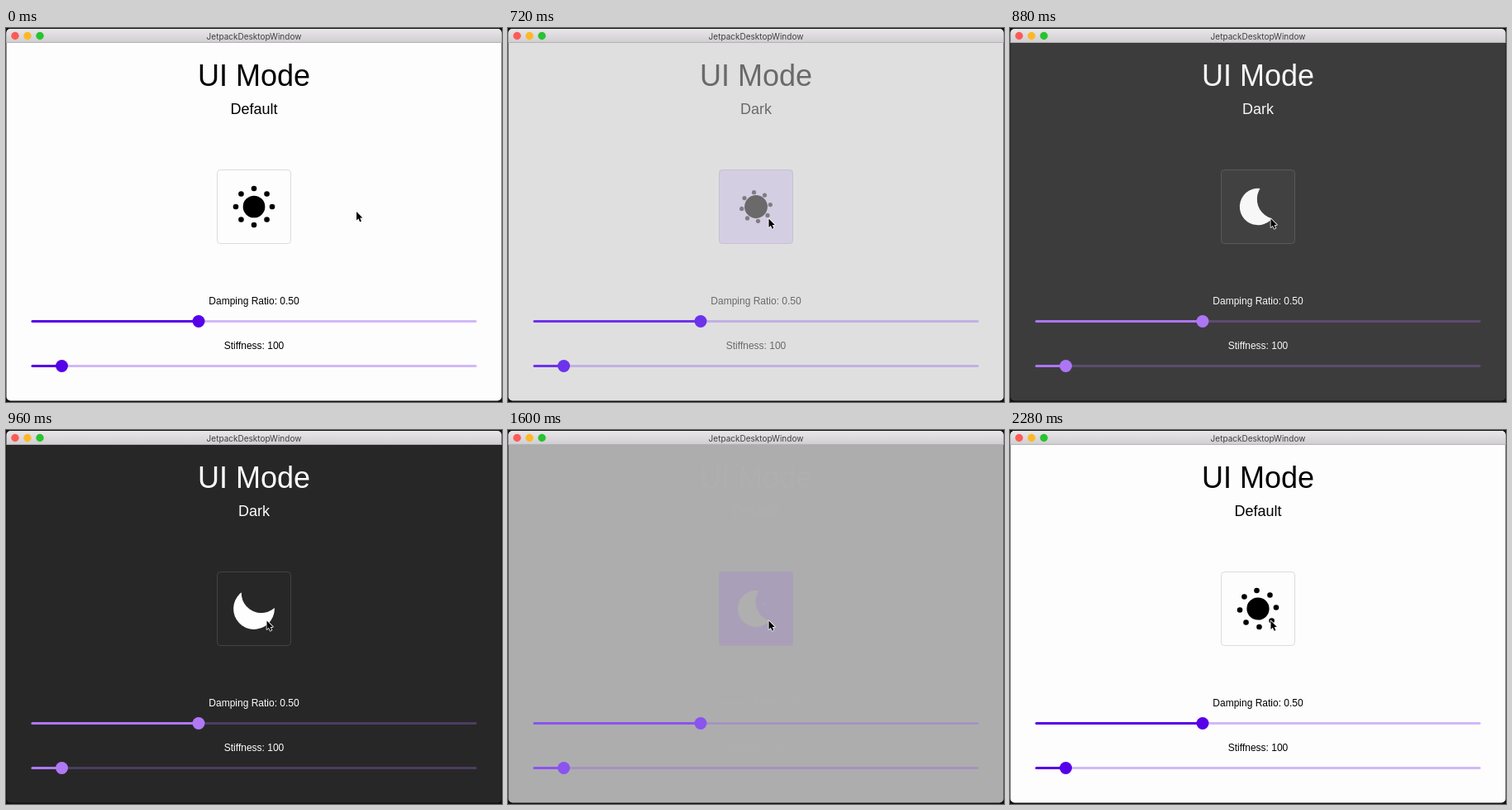
An HTML page with a canvas for the animation above (2.32 s loop, 600 by 452 pixels).

```html
<!DOCTYPE html>
<html lang="en">
<head>
<meta charset="utf-8">
<title>UI Mode</title>
<style>
html, body { margin: 0; width: 100%; height: 100%; overflow: hidden; background: #000; }
canvas { display: block; }
</style>
</head>
<body>
<canvas id="stage" width="600" height="452"></canvas>
<script>
const ctx = document.getElementById('stage').getContext('2d');
const LOOP = 2320, STEP = 40;
const TO_DARK = 685, TO_LIGHT = 1531;
const CX = 300, CY = 216, UNIT = 64 / 24;
const PRESSES = [
  { down: 483, up: TO_DARK, dark: [255, 255, 255] },
  { down: 1330, up: TO_LIGHT, dark: [176, 122, 246] }
];

const clamp = v => Math.max(0, Math.min(1, v));
const lerp = (a, b, f) => a + (b - a) * f;
const smooth = f => f * f * (3 - 2 * f);

// Spring with damping ratio 0.5 and stiffness 100; time in ms
function bouncy(ms) {
  if (ms <= 0) return 0;
  const s = ms / 1000, w = 8.66 * s;
  return 1 - Math.exp(-5 * s) * (Math.cos(w) + 0.577 * Math.sin(w));
}

// Critically damped spring
function soft(ms) {
  const a = 0.024 * Math.max(0, ms);
  return 1 - Math.exp(-a) * (1 + a);
}

const toggle = (t, spring) =>
  t < TO_LIGHT ? spring(t - TO_DARK) : 1 - spring(t - TO_LIGHT);

function mix(a, b, f) {
  return a.map((v, i) => Math.round(Math.pow(lerp(v ** 1.8, b[i] ** 1.8, clamp(f)), 1 / 1.8)));
}

const rgb = (c, alpha = 1) => `rgba(${c.join()},${alpha})`;

function disc(x, y, r, fill) {
  ctx.fillStyle = fill;
  ctx.beginPath();
  ctx.arc(x, y, Math.max(0, r), 0, 2 * Math.PI);
  ctx.fill();
}

function box(x, y, w, h, r) {
  ctx.beginPath();
  ctx.roundRect(x, y, w, h, r);
}

function label(text, y, size, fill, family = '"Liberation Sans", Arial, sans-serif') {
  ctx.font = `${size}px ${family}`;
  ctx.textAlign = 'center';
  ctx.fillStyle = fill;
  ctx.fillText(text, CX, y);
}

function drawWindow(surface) {
  ctx.fillStyle = '#111';
  ctx.fillRect(0, 0, 600, 452);
  ctx.fillStyle = rgb(surface);
  box(0.5, 1, 599, 449.5, 5);
  ctx.fill();

  const bar = ctx.createLinearGradient(0, 1, 0, 18);
  bar.addColorStop(0, '#e9e7e9');
  bar.addColorStop(1, '#cfcdcf');
  ctx.fillStyle = bar;
  box(0.5, 1, 599, 17, [5, 5, 0, 0]);
  ctx.fill();
  ctx.fillStyle = '#b4b2b4';
  ctx.fillRect(0.5, 17, 599, 1);
  ['#fc5b57', '#fdb827', '#29c231'].forEach((c, i) => disc(11 + 15 * i, 9.5, 4.7, c));
  label('JetpackDesktopWindow', 13.5, 10, '#414041', 'Inter, Roboto, sans-serif');
}

function drawSlider(y, x, color) {
  ctx.fillStyle = rgb(color, 0.27);
  box(30.5, y - 1.5, 539, 3, 1.5);
  ctx.fill();
  ctx.fillStyle = rgb(color);
  box(30.5, y - 1.5, x - 30.5, 3, 1.5);
  ctx.fill();
  disc(x, y, 7.5, rgb(color));
}

function drawRipple(t, press, theme) {
  const age = t - press.down;
  const alpha = 0.15 * clamp(age / 75) * (1 - clamp((t - press.up - 70) / 150));
  if (alpha <= 0) return;
  const f = clamp(age / 225);
  disc(lerp(315, CX, f), lerp(231, CY, f), lerp(27, 74, smooth(f)),
    rgb(mix([98, 0, 238], press.dark, theme), alpha));
}

function drawButton(t, theme, ink) {
  ctx.save();
  box(255, 171, 90, 90, 4);
  ctx.clip();
  PRESSES.forEach(p => drawRipple(t, p, theme));
  ctx.restore();
  ctx.strokeStyle = rgb(ink, 0.13);
  ctx.lineWidth = 1;
  box(255.5, 171.5, 89, 89, 4);
  ctx.stroke();
}

function drawIcon(t, ink) {
  const moon = toggle(t, bouncy);

  // Rays hide together and come back one by one, starting at the bottom
  for (let i = 0; i < 8; i++) {
    const shown = t < TO_LIGHT ? 1 - soft(t - TO_DARK) : soft(t - TO_LIGHT - 50 * i);
    const angle = Math.PI / 2 + i * Math.PI / 4 - moon * 150 * Math.PI / 180;
    const d = 22 * shown;
    disc(CX + d * Math.cos(angle), CY + d * Math.sin(angle), 3.3 * shown, rgb(ink, shown));
  }

  // The body is a disc minus a second disc that slides in
  ctx.save();
  ctx.translate(CX, CY);
  ctx.rotate(lerp(90, 40, moon) * Math.PI / 180);
  ctx.beginPath();
  ctx.rect(-99, -99, 198, 198);
  ctx.arc(lerp(18, 0, moon) * UNIT, lerp(-12, -8, moon) * UNIT, 9 * UNIT, 0, 2 * Math.PI);
  ctx.clip('evenodd');
  disc(0, 0, lerp(5, 9, moon) * UNIT, rgb(ink));
  ctx.restore();
}

function drawCursor(t) {
  const f = smooth(clamp(t / 460));
  ctx.save();
  ctx.translate(lerp(424, 315.5, f), lerp(222, 230.5, f));
  ctx.beginPath();
  [[0, 0], [0, 10.5], [2.4, 8.3], [4.1, 12.2], [5.9, 11.4], [4.2, 7.6], [7.4, 7.4]]
    .forEach(p => ctx.lineTo(...p));
  ctx.closePath();
  ctx.lineJoin = 'round';
  ctx.lineWidth = 1.5;
  ctx.strokeStyle = '#fff';
  ctx.stroke();
  ctx.fillStyle = '#000';
  ctx.fill();
  ctx.restore();
}

function draw(t) {
  const theme = toggle(t, soft);
  const surface = mix([254, 253, 254], [33, 32, 33], theme);
  const ink = mix([0, 0, 0], [255, 255, 255], theme);
  const primary = mix([86, 0, 232], [176, 122, 246], theme);
  const dark = t >= TO_DARK && t < TO_LIGHT;

  drawWindow(surface);
  label('UI Mode', 70, 36, rgb(ink));
  label(dark ? 'Dark' : 'Default', 104, 18, rgb(ink));
  drawButton(t, theme, ink);
  drawIcon(t, ink);
  label('Damping Ratio: 0.50', 334, 12, rgb(ink));
  drawSlider(354.5, 233, primary);
  label('Stiffness: 100', 388, 12, rgb(ink));
  drawSlider(408.5, 67.5, primary);
  drawCursor(t);
}

const start = performance.now();
function tick() {
  const t = (performance.now() - start) % LOOP;
  draw(Math.floor(t / STEP) * STEP);
  requestAnimationFrame(tick);
}
tick();
</script>
</body>
</html>
```
